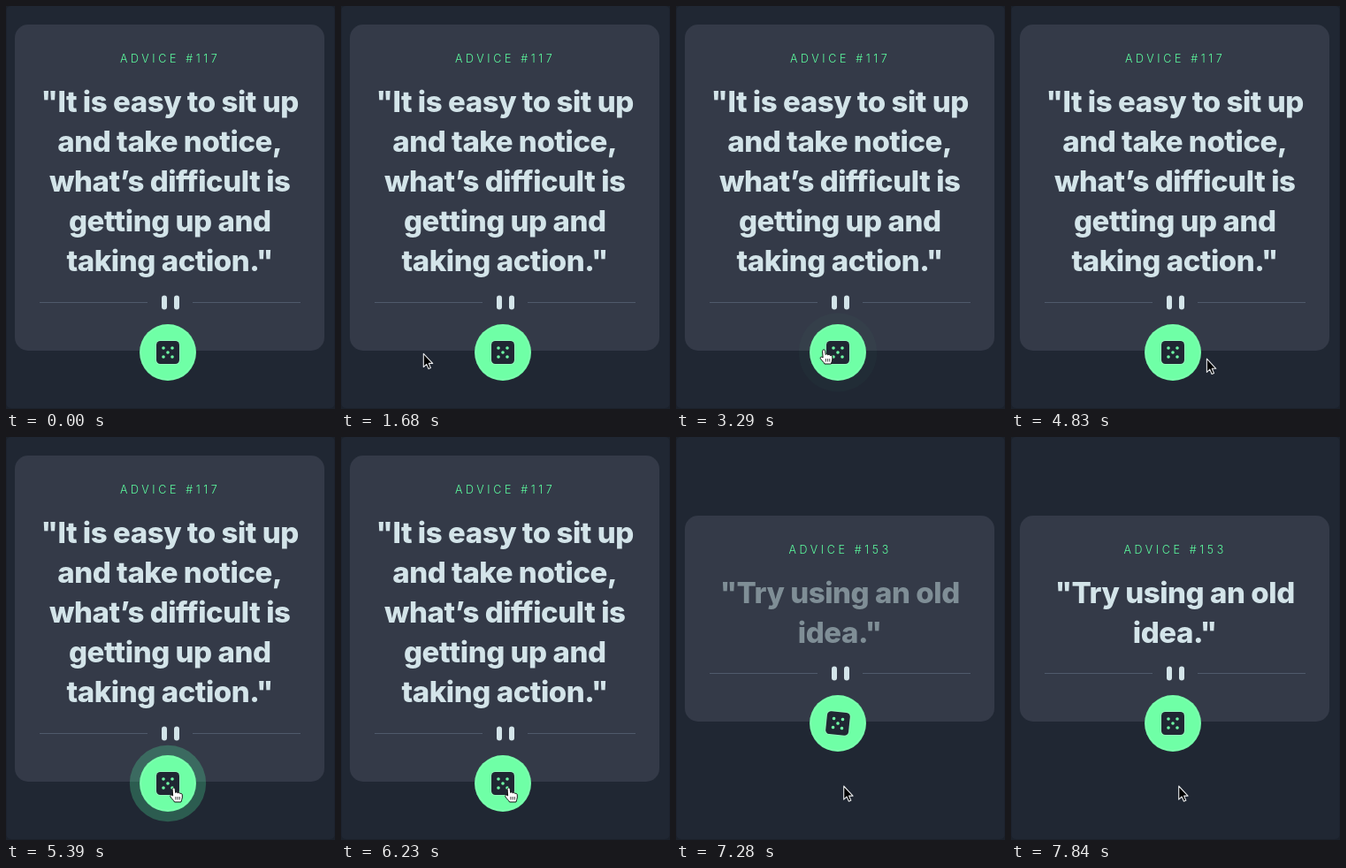
An HTML page with a canvas that plays this animation: 372x456 px, repeating every 8 s.

```html
<!DOCTYPE html>
<html lang="en">
<head>
<meta charset="utf-8">
<title>Advice card</title>
<style>
  html, body { margin: 0; width: 100%; height: 100%; overflow: hidden; background: #1b212b; }
  canvas { display: block; width: 372px; height: 456px; }
</style>
</head>
<body>
<canvas id="stage"></canvas>
<script>
const W = 372, H = 456, LOOP = 8000, STEP = 70;
const SWAP = 6790;                       // the new advice arrives
const SPIN = { start: 6738, time: 1050 };
const PULSES = [2490, 4940], PULSE_TIME = 1050;
const CLICKS = [
  { from: 1750, to: 1890, r: 21.5 },
  { from: 6160, to: 6230, r: 30.5 }
];
const GREEN = '#6fffa6', DARK = '#202733', CARD = '#343a48', LIGHT = '#d3e4e9';
const BUTTON_X = 183, BUTTON_R = 32;

const first = {
  label: 'ADVICE #117', top: 21, height: 369,
  lines: ['"It is easy to sit up', 'and take notice,', 'what’s difficult is', 'getting up and', 'taking action."']
};
const second = {
  label: 'ADVICE #153', top: 89, height: 233,
  lines: ['"Try using an old', 'idea."']
};

// pointer: time, x, y
const path = [
  [490, 205, 458], [980, 191, 382], [1260, 191, 382], [1680, 93.3, 393.3],
  [2030, 93.3, 393.3], [2870, 167.2, 387], [3290, 167.2, 387], [3710, 196, 391],
  [4130, 267, 406], [4480, 267, 406], [4830, 221.4, 399.2], [5320, 189.7, 395]
];

const canvas = document.getElementById('stage');
const ctx = canvas.getContext('2d');
const dpr = window.devicePixelRatio || 1;
canvas.width = W * dpr;
canvas.height = H * dpr;

const clamp = v => Math.min(1, Math.max(0, v));
const easeOut = v => 1 - (1 - v) ** 2;
const lerp = (a, b, k) => a + (b - a) * k;

function box(x, y, w, h, r, fill) {
  ctx.fillStyle = fill;
  ctx.beginPath();
  ctx.roundRect(x, y, w, h, r);
  ctx.fill();
}

function disc(x, y, r, fill) {
  ctx.fillStyle = fill;
  ctx.beginPath();
  ctx.arc(x, y, r, 0, Math.PI * 2);
  ctx.fill();
}

function text(str, x, y, font, spacing, fill) {
  ctx.font = font;
  ctx.letterSpacing = spacing + 'px';
  ctx.fillStyle = fill;
  ctx.textAlign = 'center';
  ctx.fillText(str, x, y);
}

function pointerAt(t) {
  let i = 0;
  while (i < path.length - 2 && t >= path[i + 1][0]) i++;
  const [t0, x0, y0] = path[i], [t1, x1, y1] = path[i + 1];
  const k = easeOut(clamp((t - t0) / (t1 - t0)));
  return { x: lerp(x0, x1, k), y: lerp(y0, y1, k) };
}

function quoteColor(t) {
  if (t < SWAP) return LIGHT;
  const k = clamp((t - SPIN.start) / SPIN.time);
  const from = [38, 50, 62], to = [211, 228, 233];
  return `rgb(${from.map((c, i) => Math.round(lerp(c, to[i], k)))})`;
}

function drawCard(t, advice) {
  const bottom = advice.top + advice.height, ruleY = bottom - 55;
  box(10, advice.top, 350, advice.height, 15, CARD);
  text(advice.label, 185.7, advice.top + 43.3, '300 12.5px Inter, sans-serif', 3.65, '#5dffa0');

  const color = quoteColor(t);
  advice.lines.forEach((line, i) =>
    text(line, 185.2, advice.top + 99.3 + i * 45, '800 33px Inter, sans-serif', -0.45, color));

  ctx.fillStyle = '#4f5a6b';
  ctx.fillRect(38, ruleY, 122, 1);
  ctx.fillRect(211, ruleY, 122, 1);
  box(176, ruleY - 7.5, 6, 16, 3, LIGHT);
  box(190, ruleY - 7.5, 6, 16, 3, LIGHT);
}

function drawButton(t, y) {
  for (const start of PULSES) {
    const k = (t - start) / PULSE_TIME;
    if (k < 0 || k >= 1) continue;
    const spread = 12.5 * (1 - (1 - k) ** 4);
    disc(BUTTON_X, y, BUTTON_R + spread, `rgba(83, 255, 170, ${1.05 * (1 - k) ** 2.6})`);
  }
  disc(BUTTON_X, y, BUTTON_R, GREEN);
  ctx.strokeStyle = 'rgba(255, 255, 255, 0.15)';
  ctx.lineWidth = 1;
  ctx.beginPath();
  ctx.arc(BUTTON_X, y, BUTTON_R - 1.5, 0, Math.PI * 2);
  ctx.stroke();

  ctx.save();
  ctx.translate(BUTTON_X, y);
  if (t >= SWAP) ctx.rotate(Math.PI * 2 * clamp((t - SPIN.start) / SPIN.time));
  box(-14, -14, 28, 28, 5.5, 'rgba(255, 255, 255, 0.25)');
  box(-13, -13, 26, 26, 4.5, DARK);
  for (const [x, py] of [[0, 0], [-5, -5], [5, -5], [-5, 5], [5, 5]]) disc(x, py, 1.8, GREEN);
  ctx.restore();
}

const arrow = new Path2D('M0 0V15.2L3.4 12L5.7 17.3L8.1 16.2L5.9 11.1H10.4Z');
const hand = new Path2D(
  'M-1.6 3.5C-1.6 1.4 1.4 1.4 1.5 3.5L2 7.5C2.4 6.3 4.4 6.5 4.6 8C5.2 6.9 7 7.2 7.2 8.7' +
  'C8 7.9 9.6 8.5 9.6 10V13C9.6 15 8.4 16 8.2 18H.8C.6 16.5-3 14-4 11.5C-4.3 10-2.4 9.5-1.1 11Z');

function drawPointer(t, buttonY) {
  if (t < 560) return;
  const { x, y } = pointerAt(t);
  const over = t >= 1890 && Math.hypot(x - BUTTON_X, y - buttonY) < BUTTON_R;

  for (const c of CLICKS) {
    if (t < c.from || t >= c.to) continue;
    ctx.strokeStyle = 'rgba(0, 0, 0, 0.35)';
    ctx.lineWidth = 2;
    ctx.beginPath();
    ctx.arc(x + 0.5, y + 2.3, c.r, 0, Math.PI * 2);
    ctx.stroke();
  }

  ctx.save();
  ctx.translate(x, y);
  ctx.lineJoin = 'round';
  if (over) {
    ctx.fillStyle = '#fff';
    ctx.strokeStyle = '#111';
    ctx.lineWidth = 1;
    ctx.fill(hand);
    ctx.stroke(hand);
    ctx.beginPath();
    for (const fx of [2.2, 4.4, 6.6]) {
      ctx.moveTo(fx, 12);
      ctx.lineTo(fx, 15.5);
    }
    ctx.lineWidth = 0.8;
    ctx.stroke();
  } else {
    ctx.fillStyle = '#000';
    ctx.strokeStyle = '#e6e8ea';
    ctx.lineWidth = 1.1;
    ctx.fill(arrow);
    ctx.stroke(arrow);
  }
  ctx.restore();
}

function draw(now) {
  const t = Math.floor((now % LOOP) / STEP) * STEP;
  const advice = t < SWAP ? first : second;
  const buttonY = advice.top + advice.height + 2;

  ctx.setTransform(dpr, 0, 0, dpr, 0, 0);
  ctx.fillStyle = '#1b212b';
  ctx.fillRect(0, 0, W, H);
  box(0.5, 0, 371, 455, 5, DARK);
  drawCard(t, advice);
  drawButton(t, buttonY);
  drawPointer(t, buttonY);
}

const begin = performance.now();
function tick() {
  draw(performance.now() - begin);
  requestAnimationFrame(tick);
}
tick();
</script>
</body>
</html>
```
